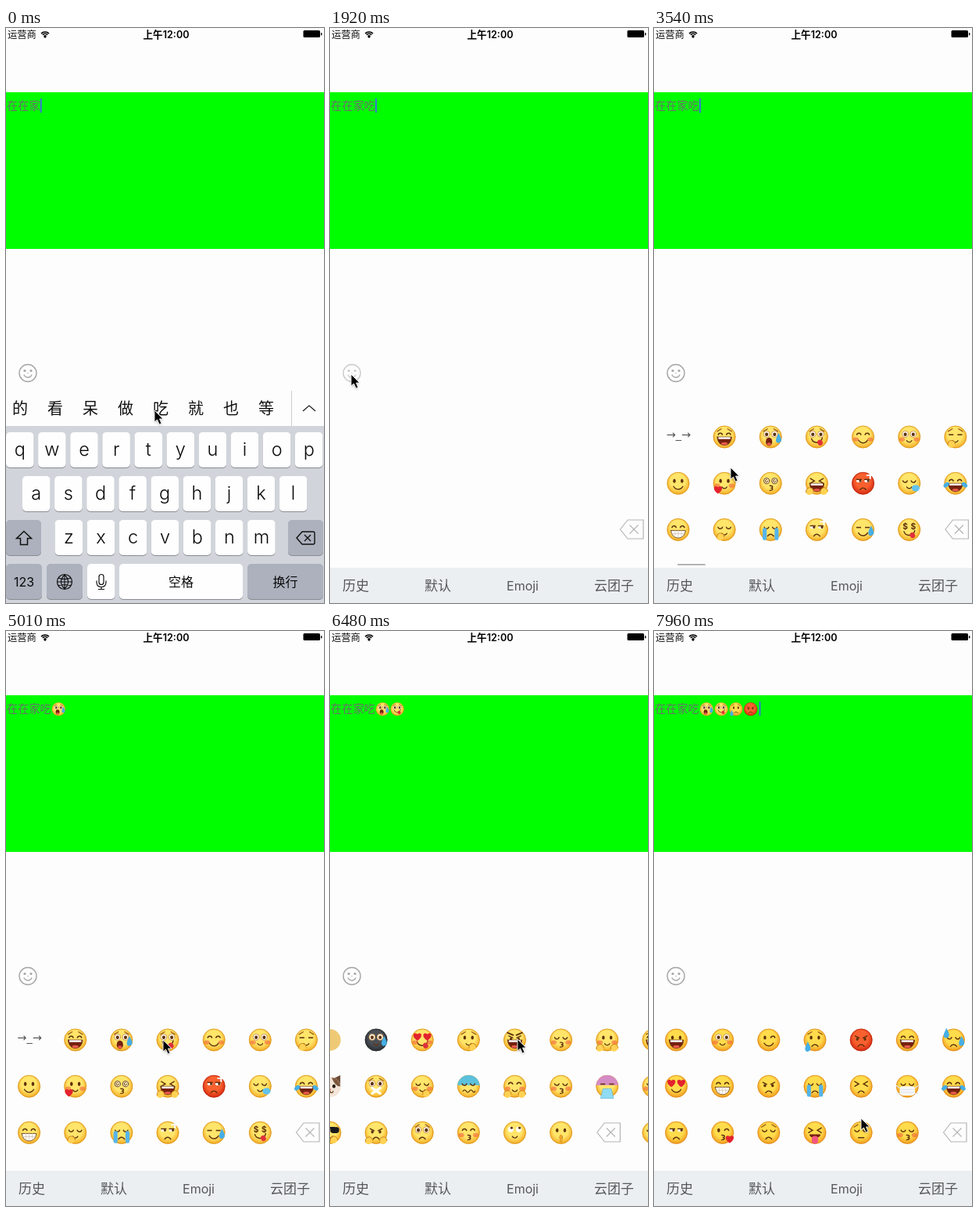
An HTML page with a canvas that plays this animation: 407 by 734 pixels, repeating every 8000 ms.

```html
<!DOCTYPE html>
<html lang="zh-CN">
<head>
<meta charset="utf-8">
<style>
html, body { margin: 0; width: 100%; height: 100%; overflow: hidden; background: #fdfdfd; }
canvas { display: block; width: 407px; height: 734px; }
</style>
</head>
<body>
<canvas id="stage"></canvas>
<script>
const W = 407, H = 734, LOOP = 8000, STEP = 147.2, PAGE = 414, PI = Math.PI;
const canvas = document.getElementById('stage');
const dpr = window.devicePixelRatio || 1;
canvas.width = W * dpr;
canvas.height = H * dpr;
const c = canvas.getContext('2d');
const FONT = 'Inter, "Noto Sans CJK SC", "Noto Sans CJK", sans-serif';

// Drawing helpers
function rect(x, y, w, h, col) { c.fillStyle = col; c.fillRect(x, y, w, h); }
function round(x, y, w, h, r, col) {
  c.fillStyle = col;
  c.beginPath(); c.roundRect(x, y, w, h, r); c.fill();
}
function text(s, x, y, size, col, align = 'center', weight = 400, family = FONT) {
  c.font = `${weight} ${size}px ${family}`;
  c.textAlign = align;
  c.fillStyle = col;
  c.fillText(s, x, y);
}
function dot(x, y, rx, ry, col, rot = 0) {
  c.fillStyle = col;
  c.beginPath(); c.ellipse(x, y, rx, ry, rot, 0, 2 * PI); c.fill();
}
function arc(x, y, r, a, b, col, lw) {
  c.strokeStyle = col; c.lineWidth = lw;
  c.beginPath(); c.arc(x, y, r, a * PI, b * PI); c.stroke();
}
function path(d, x, y, fill, stroke, lw = 1) {
  const p = new Path2D(d);
  c.save(); c.translate(x, y);
  if (fill) { c.fillStyle = fill; c.fill(p); }
  if (stroke) { c.strokeStyle = stroke; c.lineWidth = lw; c.stroke(p); }
  c.restore();
}

// Eased values between keys [time, ...values]
function at(keys, t) {
  let i = keys.findIndex(k => k[0] > t);
  if (i < 0) return keys[keys.length - 1].slice(1);
  if (i === 0) return keys[0].slice(1);
  const a = keys[i - 1], b = keys[i];
  const u = (t - a[0]) / (b[0] - a[0]), e = u * u * (3 - 2 * u);
  return a.slice(1).map((v, j) => v + (b[j + 1] - v) * e);
}

// Faces: eye code, mouth code, then extras
const INK = '#5e300c', BLUE = '#45aee6', RED = '#e3232d';
const HEART = 'M0 5C-9-1-4-7 0-3C4-7 9-1 0 5Z';
const DROP = 'M0-6C2-2 4 1 3.4 4C1 7.5-3 7.5-3.4 3.5C-3.4 0-1-3 0-6Z';
const both = f => { f(-1); f(1); };

const eyes = {
  o: s => dot(s * 4.8, -3, 1.7, 2.5, INK),
  O: s => { dot(s * 5, -3.5, 3.9, 4, '#fffdf2'); arc(s * 5, -3.5, 3.9, 0, 2, '#b9761f', 0.7); dot(s * 5, -3.2, 2, 2.3, INK); },
  n: s => arc(s * 5.2, -2, 2.7, 1.1, 1.9, INK, 1.5),
  u: s => arc(s * 5.2, -4, 2.9, 0.1, 0.9, INK, 1.4),
  '-': s => rect(s * 5.5 - 3, -3.5, 6, 1.5, INK),
  w: s => s < 0 ? eyes.o(s) : eyes.n(s),
  x: s => path(`M${s * 8}-6L${s * 3}-3L${s * 8} 0`, 0, 0, null, INK, 1.4),
  $: s => text('$', s * 5, 0, 10, INK, 'center', 700),
  '@': s => { dot(s * 5, -3, 4, 4, '#fff4c0'); arc(s * 5, -3, 3.6, 0, 2, INK, 0.9); arc(s * 5, -3, 1.6, 0, 1.6, INK, 0.9); },
  h: s => path(HEART, s * 6.2, -4, RED),
  g: s => { round(s * 6 - 5.5, -7, 11, 7.5, 3, '#17191c'); rect(-6, -7, 12, 2, '#17191c'); },
  s: s => { path(`M${s * 7.5}-5L${s * 2.5}-2.5`, 0, 0, null, INK, 1.3); dot(s * 4.8, -1, 1.6, 2, INK); },
  r: s => { dot(s * 5, -4, 3.4, 3.4, '#fff'); dot(s * 5 + 1, -6, 1.6, 1.5, INK); },
  l: s => { dot(s * 5, -3, 3.3, 1.8, '#fff'); dot(s * 5 + 1.5, -3, 1.5, 1.6, INK); rect(s * 5 - 3.5, -5.5, 7, 1.4, INK); },
};

const mouths = {
  s: () => arc(0, 1, 6.5, 0.15, 0.85, INK, 1.4),
  S: () => arc(0, 3, 3.5, 0.15, 0.85, INK, 1.3),
  f: () => arc(0, 10, 4.2, 1.15, 1.85, INK, 1.4),
  '-': () => rect(-4, 5.5, 8, 1.4, INK),
  D: () => {
    path('M-9 0H9C8.5 14-8.5 14-9 0Z', 0, 0, '#75210f', INK, 0.7);
    rect(-7.5, 0.3, 15, 2.4, '#fff');
    dot(0, 8.4, 4, 1.8, '#e85a4a');
  },
  t: () => {
    path('M-9 1H9C8.5 13.5-8.5 13.5-9 1Z', 0, 0, '#fff', INK, 0.8);
    path('M-8 5H8M-4 1V9M0 1V10M4 1V9', 0, 0, null, '#d0bda9', 0.7);
  },
  o: () => dot(0, 6, 2, 2.4, INK),
  O: () => { dot(-2, 6, 4, 5.2, '#75210f'); dot(-2, 9, 2.5, 1.8, '#e85a4a'); },
  k: () => path('M-1 3C4 3 3 6 0 6C4 6 3 9-1 9', 0, 0, null, INK, 1.3),
  T: () => { arc(0, 0, 7, 0.05, 0.9, INK, 1.4); dot(4, 7, 3.2, 3.6, '#e0313a', -0.5); },
  L: () => { path('M-7 2H7C7 8-7 8-7 2Z', 0, 0, '#75210f'); round(-4, 4, 8, 10, 4, '#f2567f'); },
  m: () => { path('M-14-1L-8 3M14-1L8 3M-13 9L-8 9M13 9L8 9', 0, 0, null, '#dfe5ea', 1.3); round(-9.5, 0, 19, 11.5, 4, '#f7f8fa'); path('M-8 4H8M-8 7.5H8', 0, 0, null, '#d5dce2', 0.8); },
  w: () => path('M-7 6Q-5 3-3 6T1 6T5 6T8 6', 0, 0, null, INK, 1.2),
  X: () => path('M-5 2L5 9M5 2L-5 9', 0, 0, null, '#fff', 3.2),
  v: () => path('M-5 3H5L8 15H-8Z', 0, 0, '#8fdcf4', '#5fb7d8', 0.7),
};
const hand = (x, y) => {
  dot(x, y, 5, 4.2, '#ffd253', -0.5);
  arc(x, y, 4.6, 0.9, 2, '#c57c14', 0.9);
};
const extras = {
  b: () => both(s => dot(s * 9, 3, 3.6, 2.6, 'rgba(244,100,60,.6)')),
  d: () => path(DROP, 10, 1, BLUE),
  e: () => path(DROP, -9, 8, BLUE),
  y: () => path(DROP, -9, -9, BLUE),
  c: () => both(s => round(s * 7.5 - 2.5, -2, 5, 15, 2, '#55b5ea')),
  j: () => both(s => dot(s * 11.5, 2, 4, 2.6, BLUE, s * 0.7)),
  h: () => path(HEART, -8, 8, RED),
  H: () => path(HEART, 9, 8, RED),
  '+': () => path('M9-14V-6M5-10H13', 0, 0, null, '#fff', 2),
  B: () => dot(8, 6, 5, 4, '#62c3ee'),
  p: () => both(s => hand(s * 9, 10)),
  g: () => hand(-5, 9),
  G: () => hand(5, 9),
  q: () => both(s => path(`M${s * 9}-7L${s * 4}-10`, 0, 0, null, '#9c5c17', 1.3)),
  a: () => both(s => path(`M${s * 9}-9L${s * 2}-6`, 0, 0, null, INK, 1.8)),
  i: () => path('M0 4V12', 0, 0, null, '#eca52b', 3.5),
};
const tints = {
  R: ['#f8602f', '#d62a10', '#a81f0c'], K: ['#4b4f56', '#2b2e33', '#222'],
  Y: ['#ffe56a', '#f3ab24', '#cf850f'], A: ['#ffdc4c', '#f09a1e', '#d9821a'],
};

function face(code, x, y, r = 14) {
  c.save();
  c.translate(x, y);
  c.scale(r / 14, r / 14);
  c.lineCap = 'round';
  const [e, m, ...more] = code;
  if (e === 'C') cat();
  else if (e === 'P') dot(0, 0, 13.5, 13.5, '#efca76');
  else {
    const tint = tints[more.find(k => tints[k])] || tints.Y;
    const g = c.createRadialGradient(-1, -5, 2, 0, -1, 15);
    g.addColorStop(0, tint[0]);
    g.addColorStop(0.55, tint[0]);
    g.addColorStop(1, tint[1]);
    dot(0, 0, 14, 14, g);
    arc(0, 0, 13.7, 0, 2, tint[2], 0.6);
    for (const [k, col] of [['U', '#5cc1dc'], ['V', '#d58bc4']])
      if (more.includes(k)) { c.fillStyle = col; c.beginPath(); c.arc(0, 0, 14, 1.03 * PI, 1.97 * PI); c.fill(); }
    both(eyes[e]);
    mouths[m]();
    for (const k of more) if (extras[k]) extras[k]();
  }
  c.restore();
}
function cat() {
  both(s => path(`M${s * 13}-14L${s * 3}-9L${s * 13}-1Z`, 0, 0, '#6d4a35'));
  dot(0, 1, 13.5, 12.5, '#f3e6d8');
  both(s => path(`M${s * 2}-11Q${s * 12}-10 ${s * 13} 0Q${s * 7} 1 ${s * 2}-11Z`, 0, 0, '#7d573f'));
  both(s => dot(s * 5, 0, 2, 2.3, '#2c1b12'));
  dot(0, 4, 1.6, 1.1, '#d77b74');
  both(s => arc(s * 2, 6, 2, 0, 1, INK, 1));
}

const list = s => s.split(' ');
const first = list('# nDq OOdq OTq nsb OSb -Sgq os oSbh @k xDp lfR+ uSB nDj nt uSg ufc lf+ -sd $T');
const second = list('P OSdK hTb oSGq sDa ukb oSpb CC OXq uSGb uwU nSbp ukb -vV gSG sfp Ofq nkb rS ooi');
const apple = list('oDA OSAb wsA ofAeq sfR nDA ufAdy hsA ntA sfA ufAc xfA umA nDAj lfA wkAH ufAq xLA u-Aq ukAb');
let seed = 7;
const random = () => (seed = seed * 16807 % 2147483647) / 2147483647;
const pool = first.slice(1).concat(second.slice(8));
const mixed = () => Array.from({ length: 20 }, () => pool[Math.floor(random() * pool.length)]);
const pages = [[], first, second, mixed(), mixed(), mixed(), mixed(), apple];

function drawPage(codes, left) {
  const y = row => 522 + row * 59.2;
  codes.forEach((code, i) => {
    const x = left + 29.57 + (i % 7) * PAGE / 7, cy = y(Math.floor(i / 7));
    if (code === '#') text('→_→', x + 0.5, cy + 2, 14.5, '#555', 'center', 400, '"DejaVu Sans", sans-serif');
    else face(code, x, cy, 14.3);
  });
  path('M0 0L9.5-12H29.5V12H9.5ZM12-5.5L23 5.5M23-5.5L12 5.5', left + 371.5, 640, null, '#b5b5b5', 1.2);
}

// Motion
const mouse = [
  [0, 190, 488], [440, 190, 488], [740, 140, 508], [1170, 27, 442], [2050, 27, 442],
  [2350, 136, 704], [2500, 136, 704], [2940, 98, 561], [3680, 98, 561], [4260, 148, 520],
  [4710, 148, 520], [5000, 201, 522], [5200, 201, 522], [5740, 239, 706], [6040, 239, 706],
  [6470, 240, 521], [6620, 240, 521], [6910, 206, 520], [7220, 206, 520], [7500, 265, 520],
  [7660, 265, 520], [7940, 265, 622],
];
const scroll = [
  [2350, 0], [2645, 412.6], [3680, 412.6], [3820, 414], [5880, 414],
  [6035, 579.6], [6476, 857.6], [6770, 2899],
];
const TYPED = 290, SWAP = 1900;
const inserts = [[4410, 'OOdq'], [5150, 'OTq'], [7210, 'ofAeq'], [7650, 'sfR']];

function statusBar() {
  text('运营商', 2, 13, 12.3, '#111', 'left');
  for (const r of [3, 5.6, 8]) arc(50, 12, r - 1, 1.25, 1.75, '#000', 1.7);
  dot(50, 11.3, 1.4, 1.4, '#000');
  text('上午12:00', 205, 13, 12.6, '#000', 'center', 600);
  round(380.5, 3, 21.5, 9, 1.5, '#000');
  round(403, 6, 1.4, 3.5, 0.7, '#000');
}

function field(t) {
  rect(0, 82, W, 200, '#00fd00');
  const s = t < TYPED ? '在在家' : '在在家吃';
  [...s].forEach((ch, i) => text(ch, 1 + i * 14.2, 104, 14, '#6d6d6d', 'left', 400));
  const done = inserts.filter(k => k[0] <= t);
  done.forEach((k, i) => face(k[1], 67.3 + i * 18.8, 99.7, 8.5));
  const last = done.length ? done[done.length - 1][0] : t < TYPED ? 0 : TYPED;
  const x = done.length ? 58.8 + done.length * 18.9 : 1 + s.length * 14.2;
  if ((t - last) % 1620 < 500) rect(x + 0.2, 90, 1.8, 18, '#4169e8');
}

function smiley(pressed) {
  const col = pressed ? '#cbcbcb' : '#a6a6a6';
  arc(28, 440.5, 11, 0, 2, col, 1.4);
  both(s => dot(28 + s * 4, 437.5, 1.6, 1.6, col));
  dot(28, 440.5, 0.7, 0.7, col);
  arc(28, 440.5, 5.5, 0.12, 0.88, col, 1.3);
}

function key(x, y, w, label, grey, size = 23.5) {
  round(x, y + 1, w, 45, 5, '#888b91');
  round(x, y, w, 45, 5, grey ? '#acb1bd' : '#fefefe');
  if (label) text(label, x + w / 2, y + (size > 20 ? 30 : 29), size, '#0a0a0a', 'center', size > 20 ? 300 : 400);
}

function keyboard(t) {
  rect(0, 508, W, 226, '#d1d5db');
  [...(t < TYPED ? '的看呆做吃就也等' : '饭的了完过不到货')].forEach((ch, i) => text(ch, 18 + i * 45, 493, 20, '#111', 'center', 300));
  rect(365, 463, 1, 45, '#c9ccd0');
  path('M0 7L8 0L16 7', 380, 482, null, '#222', 1.3);

  [['qwertyuiop', 0, 516], ['asdfghjkl', 21, 572], ['zxcvbnm', 62.5, 628]].forEach(([row, x, y]) =>
    [...row].forEach((ch, i) => key(x + i * 41.1, y, 35.6, ch)));
  key(0, 628, 45, '', true);
  path('M0-9L9.5 0H4.5V8H-4.5V0H-9.5Z', 23, 651.5, null, '#111', 1.5);
  key(361, 628, 45, '', true);
  path('M-12 0L-5-8H9Q11-8 11-6V6Q11 8 9 8H-5ZM-2-4L6 4M6-4L-2 4', 384, 651, null, '#111', 1.4);

  key(0, 684, 46, '123', true, 16);
  key(52, 684, 46, '', true);
  arc(75, 707, 9.5, 0, 2, '#111', 1.2);
  path('M-9 0H9M0-9V9M-8-5Q0-2 8-5M-8 5Q0 2 8 5M0-9Q-9 0 0 9Q9 0 0-9', 75, 707, null, '#111', 1.1);
  key(104, 684, 35.5, '');
  path('M-3-6Q-3-9 0-9Q3-9 3-6V1Q3 4 0 4Q-3 4-3 1ZM-6-1V1Q-6 7 0 7Q6 7 6 1V-1M0 7V10M-4 10H4', 122, 706.5, null, '#111', 1.2);
  key(145, 684, 158, '空格', false, 16);
  key(309, 684, 97, '换行', true, 16);
}

function emojiPanel(t) {
  const [pos] = at(scroll, t);
  pages.forEach((codes, i) => {
    const left = i * PAGE - pos;
    if (left > -PAGE - 30 && left < W + 30) drawPage(codes, left);
  });
  if (t > 2350 && t < 3750) round(30 * pos / PAGE, 684, 36, 2, 1, '#b3b3b3');
  rect(0, 689, W, 45, '#eceff1');
  const pressed = t > 2340 && t < 2520 ? 1 : t > 5870 && t < 6180 ? 2 : -1;
  [['历史', 33, 17], ['默认', 138, 17], ['Emoji', 246.5, 16], ['云团子', 363.5, 17]].forEach(([s, x, size], i) =>
    text(s, x, 718.3, size, i === pressed ? '#b4b6b8' : '#555759'));
}

function pointer(t) {
  const [x, y] = at(mouse, t);
  const arrow = 'M0 0V15L3.5 12L6.2 18L9 16.8L6.5 11H11Z';
  c.save();
  c.shadowColor = 'rgba(0,0,0,.35)';
  c.shadowBlur = 3;
  c.shadowOffsetY = 1;
  path(arrow, x, y, '#fff');
  c.restore();
  path(arrow, x, y, '#000', '#fff', 0.9);
}

function draw(now) {
  const t = Math.floor((now % LOOP) / STEP) * STEP;
  c.setTransform(dpr, 0, 0, dpr, 0, 0);
  rect(0, 0, W, H, '#fdfdfd');
  statusBar();
  field(t);
  smiley(t > 1610 && t < 2050);
  if (t < SWAP) keyboard(t); else emojiPanel(t);
  pointer(t);
}

let start;
function tick(now) {
  start ??= now;
  draw(now - start);
  requestAnimationFrame(tick);
}
draw(0);
requestAnimationFrame(tick);
</script>
</body>
</html>
```
